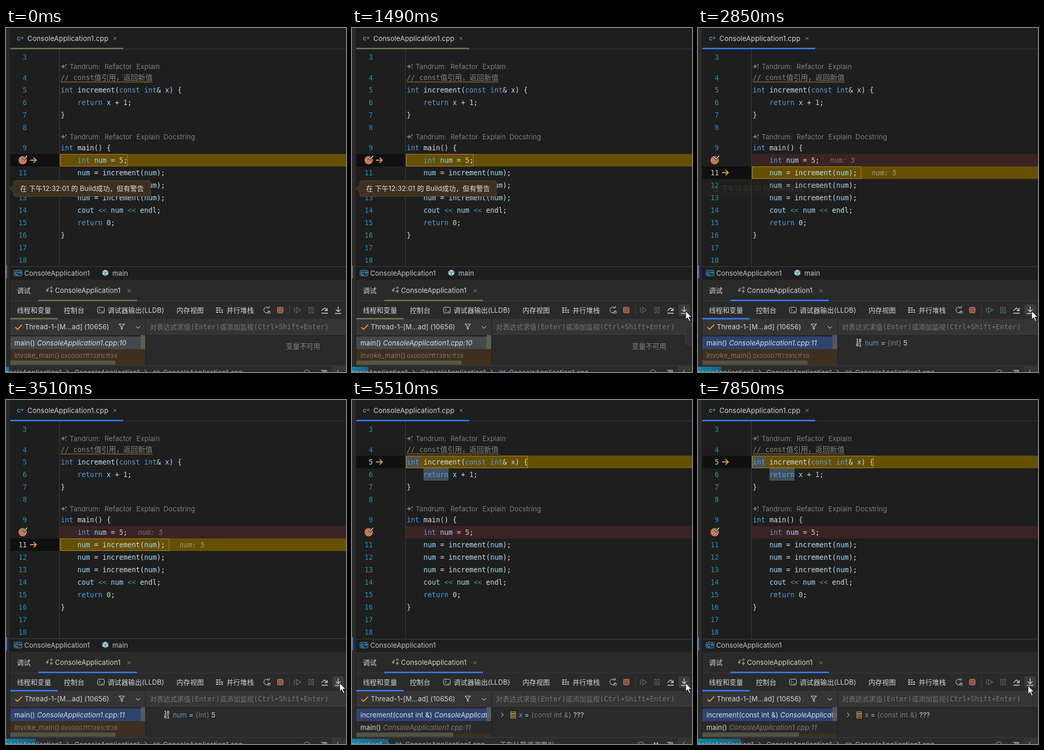
An HTML page that plays this animation: 652x661 px, repeating every 8 s.

```html
<!DOCTYPE html>
<html lang="zh">
<head>
<meta charset="utf-8">
<title>Debugger stepping</title>
<style>
html, body { margin: 0; width: 100%; height: 100%; overflow: hidden; background: #1e1e1e; }
svg { display: block; }
text { white-space: pre; font: 13px Inter, "Noto Sans CJK SC", sans-serif; letter-spacing: .11px; }
.mono { font: 13.29px "DejaVu Sans Mono", "Noto Sans CJK SC", monospace; letter-spacing: 0; }
.i { font-style: italic; }
</style>
</head>
<body>
<svg id="stage" width="652" height="661" viewBox="0 0 652 661"></svg>
<script>
const LOOP = 8000;
const steps = [0, 500, 830, 1160, 1490, 2520, 2850, 3180, 3510, 5180, 5510, 5840, 7850];
const stage = document.getElementById('stage');
const BLUE = '#3574f0', OLIVE = '#667052', LIGHT = '#d4d6d9', GREY = '#7d7d7d', PANEL = '#2a2a2a', GOLD = '#665000';

const rect = (x, y, w, h, fill, more = '') =>
  `<rect x="${x}" y="${y}" width="${w}" height="${h}" fill="${fill}" ${more}/>`;
const text = (x, y, s, fill = LIGHT, more = '') =>
  `<text x="${x}" y="${y}" fill="${fill}" ${more}>${s}</text>`;
const mono = (x, y, s, fill, cls = '') => text(x, y, s, fill, `class="mono ${cls}"`);
const line = (d, color = LIGHT, width = 1.2, fill = 'none') =>
  `<path d="${d}" stroke="${color}" stroke-width="${width}" fill="${fill}"/>`;
const span = (s, fill, more = '') => `<tspan fill="${fill}" ${more}>${s}</tspan>`;

const source = {
  5: 'int increment(const int& x) {', 6: '    return x + 1;', 7: '}',
  9: 'int main() {', 10: '    int num = 5;', 11: '    num = increment(num); ',
  12: '    num = increment(num);', 13: '    num = increment(num);',
  14: '    cout << num << endl;', 15: '    return 0;', 16: '}'
};
const rowY = n => n == 3 ? 56 : n == 4 ? 95.5 : n < 9 ? 119 + (n - 5) * 24 : 230 + (n - 9) * 24;

function paint(s) {
  return s.replace(/\b(int|const|return)\b|\b(num|x|cout)\b|(<<)|\b(\d)\b|\b(increment|endl)\b/g,
    (m, key, name, op, digit) => op ? span('&lt;&lt;', '#4f8f94')
      : span(m, key ? '#569cd6' : name ? '#9cdcfe' : digit ? '#c3d6b8' : '#c6e0f2'));
}

const cppIcon = (x, y) => text(x, y, 'C', '#4fa3d9', 'style="font-size:9px;font-weight:700"') +
  line(`M${x + 7} ${y - 5}h6M${x + 10} ${y - 8}v6`, '#4fa3d9', 1);
const cross = (x, y) => line(`M${x - 3} ${y - 3}l6 6m0-6l-6 6`, '#8c8e91', 1);
const chevron = (x, y) => line(`M${x - 2} ${y - 4}l4 4-4 4`, '#9a9c9f', 1.2);

function lens(y, words) {
  const xs = [122, 189, 250, 302];
  return line(`M109.500 ${y - 4}l1.200 3 3 1-3 1-1.200 3-1.200-3-3-1 3-1z`, GREY, .6, GREY) +
    line(`M115 ${y - 5}v4m-2-2h4M115 ${y + 2}v3`, GREY, 1) +
    words.map((w, i) => text(xs[i], y + 4.5, w, GREY)).join('');
}

function editor(st) {
  const { active, caret } = st;
  const arrow = y => line(`M46 ${y}h12m-5-5l5 5-5 5`, st.running ? '#d8ad78' : '#dc9a4a', 2);
  let out = rect(0, 0, 652, 484, '#1e1e1e') + rect(0, 0, 7, 661, '#2b2b2b');
  out += rect(8, 40, 644, 1, '#333') + rect(8, 38, 217, 3, st.step > 5 ? BLUE : OLIVE, 'rx="1"');
  out += cppIcon(21, 24) + text(41, 25, 'ConsoleApplication1.cpp', LIGHT, 'style="letter-spacing:.2px"') + cross(209, 20);

  if (active != 10) out += rect(103, 242, 549, 24, '#3a2323');
  if (st.running) out += rect(8, 107, 644, 24, '#101010');
  else out += rect(8, rowY(caret) - 12, 94, 24, '#101010');
  out += rect(102, 41, 1, 418, '#3c3c3c');

  const y = rowY(active);
  out += rect(103, y - 12, 549, 24, GOLD);
  out += rect(104.5, y - 11.5, source[active].length * 8, 23, 'none', `stroke="${active == 10 ? '#b87a30' : '#a98a1c'}"`);
  if (active == 5) out += rect(105, 108, 24, 22, '#4c5356') + rect(137, 131, 48, 24, '#43505c');
  out += arrow(y);

  for (let n = 3; n <= 18; n++) {
    if (n != 10) out += mono(n > 9 ? 24 : 32, rowY(n) + 5, n, n == caret ? '#cfcfc4' : '#2b8db2');
    if (source[n]) out += mono(105, rowY(n) + 4.5, paint(source[n]), '#dcdcdc');
  }
  out += mono(105, 100, '// const' + span('值引用，返回新值', '#84847a', 'style="font-size:14px"'), '#84847a');
  out += line('M105 105' + 'l2-2.500l2 2.500'.repeat(44), '#a07c4c', 1);
  out += lens(74, ['Tandrum:', 'Refactor', 'Explain']);
  out += lens(209, ['Tandrum:', 'Refactor', 'Explain', 'Docstring']);
  out += `<circle cx="32" cy="254" r="8" fill="#c47c58"/>` +
    line('M32 249l3 3 5.500-6.500', '#1e1e1e', 3.6) + line('M32 249l3 3 5.500-6.500', '#e4e4e4', 1.5);
  if (active == 11)
    out += mono(253, 258.5, 'num: 5', '#7b716c', 'i') + mono(333, 282.5, 'num: 5', '#979a90', 'i');

  out += rect(8, active == 5 ? 459 : 458, 644, 1, '#414141');
  out += rect(15.5, 465.5, 15, 11, '#1c303c', 'rx="2" stroke="#4794c4"') + cppIcon(17, 475);
  out += text(35, 476, 'ConsoleApplication1', '#c3c5c8');
  if (active != 5) out += line('M190.500 464.500l5.500 2.800v6l-5.500 3-5.500-3v-6z', '#7fb3be', 0.6, '#a3cfd8') +
    line('M185 467.500l5.500 2.800 5.500-2.800M190.500 470v6', '#35616c', 1) + text(204, 476, 'main', '#c3c5c8');
  return out + rect(0, 456, 2, 25, st.focus ? BLUE : '#66675c');
}

function tooltip(opacity) {
  return `<g opacity="${opacity}">` +
    line('M19 293.500H273q4 0 4 4V319.500q0 4-4 4H19q-4 0-4-4V315L7.500 308.500 15 302V297.500q0-4 4-4z', '#5f4a30', 1, '#3d3021') +
    text(27, 313, '在 下午12:32:01 的 Build成功，但有警告', '#dfe1e5') + '</g>';
}

function toolbar(st) {
  const accent = st.focus ? BLUE : OLIVE;
  const dim = '#5d6063', run = st.active == 11 ? '#4e8067' : '#5c6a62';
  let out = rect(8, 484, 644, 177, PANEL);
  out += text(21, 509, '调试', LIGHT, 'font-weight="600"');
  out += line('M76 504h6m-3-3v6M84 506h6m-3-3v6M81 499v3', '#bfc1c4', 1.2) +
    '<circle cx="87" cy="499" r="2.5" fill="#5e7f57"/>' + text(94, 509, 'ConsoleApplication1') + cross(236, 505);
  out += rect(8, 524, 644, 1, '#3a3a3a') + rect(62, 522, 189, 3, accent);
  out += text(21, 547, '线程和变量') + text(111, 547, '控制台') + text(195, 547, '调试器输出(LLDB)') +
    text(327, 547, '内存视图') + text(423, 547, '并行堆栈');
  out += rect(175.5, 536.5, 13, 11, 'none', 'rx="2" stroke="#ced0d6"') + line('M178 539l3 3-3 3M183 545h4', LIGHT, 1);
  out += line('M403 538h4m1.500 0h3M403 542h4m1.500 0h3m1.500 0h3M403 546h4m1.500 0h3m1.500 0h3', LIGHT, 2);
  out += rect(8, 559, 644, 30, '#353535') + rect(8, 557, 91, 3, accent);
  out += line('M504 538a5.500 5.500 0 1 0 1 6M505 534v4h-5M503 548a2.500 2.500 0 1 1 3 0z', '#aeb1b5');
  out += rect(520.5, 536.5, 11, 11, '#88583f', 'rx="2" stroke="#c67b55"') + rect(543, 532, 1, 20, '#444');
  out += line('M553 537v10M557 537l8 5-8 5z', st.running ? '#6c6f72' : run, 1.3, st.running ? '#6c6f72' : 'none');
  const pause = st.running ? LIGHT : run;
  out += rect(580.5, 536.5, 3, 11, 'none', `stroke="${pause}"`) + rect(586.5, 536.5, 3, 11, 'none', `stroke="${pause}"`);
  if (st.step > 1 && !st.running)
    out += rect(626, 531, 22, 22, st.step == 5 ? '#50514f' : '#3b3c3d', 'rx="4"');
  const move = st.running ? dim : LIGHT;
  return out + line('M605 543l6-5 5 5M616 538v5h-5M605 548h12', move, 1.3) +
    line('M637 535v10m-4.500-4l4.500 4 4.500-4M631 548.500h12', move, 1.4);
}

function frames(st) {
  const deep = st.step > 8;
  const file = n => 'ConsoleApplication1.cpp' + (n ? ':' + n : '');
  const thumb = st.focus ? '#5c5c5f' : '#5b6550';
  let out = line('M18 575l4 4 9-9', '#d99b37', 2) + text(36, 579, 'Thread-1-[M...ad] (10656)') +
    line('M217 569h10l-4 5v5l-2-1v-4z', LIGHT, 1.1) + line('M249 573l4 4 4-4', '#aaa', 1.2);
  out += rect(8, 588, 644, 1, '#3f3f3f') + rect(8, 593, 259, 24, st.focus ? '#2e436e' : '#44494a');
  out += rect(8, deep ? 641 : 617, 259, deep ? 7 : 31, '#3e2f20');
  const row1 = deep ? ['increment(const int &amp;) ', file()] : ['main() ', file(st.active)];
  out += '<g clip-path="url(#list)">' + text(16, 610, row1[0] + span(row1[1], '#dfe1e5', 'class="i"'), '#dfe1e5');
  out += deep ? text(16, 634, 'main() ' + span(file(11), GREY, 'class="i"'))
    : text(16, 634, 'invoke_main()', '#80766c') + text(105, 634, '0x00007ff7391c1f39', '#80766c', 'style="font-size:11px"');
  out += '</g>' + rect(258, 590, 9, 27, thumb, 'opacity=".85"') +
    rect(8, 639, deep ? 186 : 202, 8, st.focus ? '#55554f' : '#555c48', 'opacity=".9"');
  out += rect(267, 560, 1, 88, '#1f1f1f');
  const cjk = s => span(s, '#72757a', 'style="font-size:13px"');
  out += mono(276, 579, cjk('对表达式求值') + '(Enter)' + cjk('或添加监视') + '(Ctrl+Shift+Enter)', '#72757a');

  const value = (x, name, type, v) =>
    text(x, 610, span(name, '#5a9fca') + ' = ' + span(type, '#85796d') + ' ' + v);
  if (st.active == 10) out += text(537, 616, '变量不可用', '#858585');
  else if (st.running) out += text(303, 610, '正在收集数据...', '#858585');
  else if (st.active == 11) {
    const bits = 'style="font:700 8.5px DejaVu Sans Mono,monospace"';
    out += text(303, 604, '10', LIGHT, bits) + text(303, 612, '01', LIGHT, bits) + value(320, 'num', '{int}', 5);
  } else {
    out += chevron(288, 605) + [599, 603.5, 608].map(y => rect(304.5, y, 9, 3.5, '#4c3c25', 'stroke="#c69248"')).join('');
    out += value(320, 'x', '{const int &amp;}', '???');
  }
  return out;
}

function statusBar(st) {
  const indexing = st.step == 10, c = '#a7a9ac', shift = indexing ? -199 : 0;
  let out = rect(0, 648, 652, 13, '#2b2b2b') + rect(8, 648, 644, 1, '#3c3c3c');
  out += rect(625, 650, 27, 11, '#363636') + rect(0, 651, 6.5 + 6.3 * st.step, 10, 'url(#teal)');
  if (!indexing) out += text(-19, 666.5, 'ConsoleApplication1', c) + chevron(118, 661);
  out += text(131 + shift, 666.5, 'ConsoleApplication1', c) + chevron(268 + shift, 661) +
    cppIcon(282 + shift, 665) + text(301 + shift, 666.5, 'ConsoleApplication1.cpp', c);
  if (indexing) out += text(283, 667, '正在计算资源索引', c);
  const x = indexing ? 554 : 577, green = st.step > 6 && st.step < 10;
  out += `<circle cx="${x}" cy="663" r="6" fill="none" stroke="${green ? '#58875a' : '#77796f'}" stroke-width="1.3"/>`;
  if (indexing) out += rect(579, 658, 3, 3, c) + rect(584, 658, 3, 3, c);
  return out + line('M604 657.500h11v4h-4z', '#9a9c90', 1, '#77796f') + line('M638 657q-3 2-3 6', c, 1.2);
}

function cursor(st) {
  const [x, y] = [[638, 558], [641, 546], [640, 544], [633, 549]][st.step == 12 ? 3 : Math.min(st.step, 3) - 1];
  return line(`M${x} ${y}v16l3.700-3.500 3 7 2.500-1-3-7h5z`, '#111', 1, '#fff');
}

function scene(step) {
  const st = { step, focus: step > 4, running: step == 9,
    active: step < 6 ? 10 : step < 10 ? 11 : 5 };
  st.caret = step == 9 ? 5 : st.active;
  const fade = step < 5 ? 1 : [0.68, 0.12][step - 5] || 0;
  let out = `<defs><linearGradient id="teal"><stop stop-color="#0f87a5"/><stop offset="1" stop-color="#1d5d7c"/></linearGradient>
    <clipPath id="list"><path d="M8 589H267V648H8z"/></clipPath></defs>`;
  out += editor(st);
  if (fade) out += tooltip(fade);
  out += toolbar(st) + frames(st) + statusBar(st);
  if (step == 4) out += rect(639.5, 572.5, 20, 35, '#303133', 'stroke="#424345"');
  return step ? out + cursor(st) : out;
}

let shown = -1;
function tick() {
  const t = performance.now() % LOOP;
  const step = steps.filter(s => s <= t).length - 1;
  if (step != shown) stage.innerHTML = scene(shown = step);
  requestAnimationFrame(tick);
}
tick();
</script>
</body>
</html>
```
